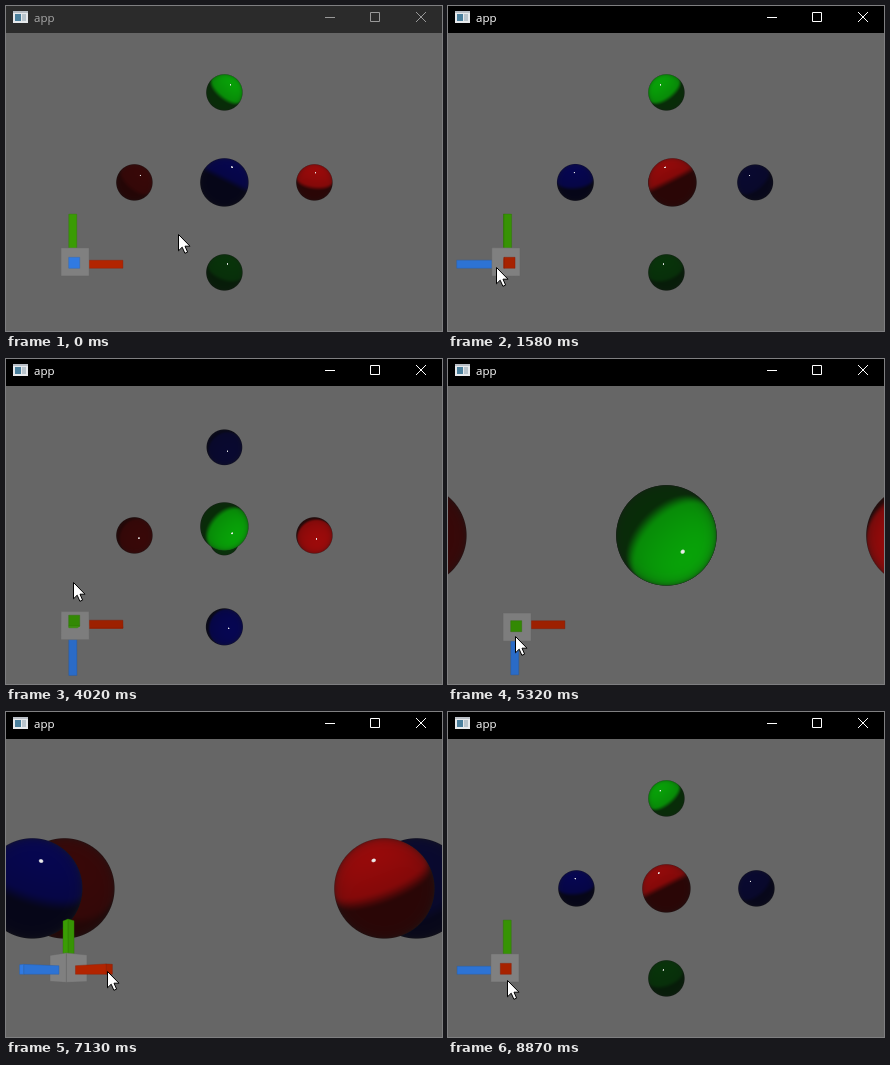
These frames come from a looping animation (436x325 px, 9.27 s). An HTML page with a canvas:

```html
<!DOCTYPE html>
<html lang="en">
<head>
<meta charset="utf-8">
<title>app</title>
<style>
  html, body { margin: 0; width: 100%; height: 100%; overflow: hidden; background: #666; }
  canvas, svg { position: absolute; left: 0; top: 0; display: block; }
  text { font: 11.5px "Open Sans", "Noto Sans", sans-serif; }
</style>
</head>
<body>
<canvas id="scene" width="436" height="325"></canvas>
<svg width="436" height="325" viewBox="0 0 436 325">
  <rect id="bar" width="436" height="27"/>
  <g id="icon">
    <rect x="7" y="5" width="15" height="12" fill="#e6e9ec"/>
    <rect x="7" y="5" width="15" height="2" fill="#b9bfc6"/>
    <rect x="9" y="8" width="6" height="7" fill="#4a7f9c"/>
    <rect x="16" y="8" width="4" height="7" fill="#b8c4cc"/>
  </g>
  <text id="label" x="28" y="16">app</text>
  <path id="buttons" fill="none" d="M319 11.5h10M364.5 6.5h9v9h-9zM410 6l10 10M420 6l-10 10"/>
  <path id="cursor" d="M.5 .5V16.8L4.2 13.2 6.9 19.3 9.6 18.1 7 12.2H12z" fill="#fff" stroke="#000" stroke-width="1"/>
</svg>
<script>
const LOOP = 9270, RATE = 0.006;
const $ = id => document.getElementById(id);
const ctx = $('scene').getContext('2d');
const buffer = document.createElement('canvas');
const bctx = buffer.getContext('2d');

const dot = (a, b) => a[0] * b[0] + a[1] * b[1] + a[2] * b[2];
const add = (a, b, k = 1) => a.map((v, i) => v + b[i] * k);
const unit = a => { const n = Math.hypot(...a); return a.map(v => v / n); };
const cross = (a, b) => [0, 1, 2].map(i => {
  const j = (i + 1) % 3, k = (i + 2) % 3;
  return a[j] * b[k] - a[k] * b[j];
});
const clamp = v => Math.min(1, Math.max(0, v));
const smooth = (a, b, v) => { v = clamp((v - a) / (b - a)); return v * v * (3 - 2 * v); };

const LIGHT = [1, 2, 1];
const SPHERES = [
  { at: [1, 0, 0], dark: [42, 6, 6], lit: [156, 10, 10] },
  { at: [-1, 0, 0], dark: [36, 6, 6], lit: [56, 8, 8] },
  { at: [0, 1, 0], dark: [8, 44, 8], lit: [8, 164, 8] },
  { at: [0, -1, 0], dark: [7, 28, 9], lit: [8, 52, 10] },
  { at: [0, 0, 1], dark: [6, 6, 24], lit: [6, 6, 82] },
  { at: [0, 0, -1], dark: [7, 7, 26], lit: [9, 9, 48] }
];

// Each turn eases exponentially towards a view: [start, yaw, pitch] in degrees.
const TURNS = [[1008, 90, 0], [2353, 0, 0], [3513, 0, 90], [5843, 0, 0], [6995, 90, 0]];
const ORTHO_ON = 4900, ORTHO_OFF = 8850, FOCUS_AT = 950;

// Pointer stops: [time, x, y]
const PATH = [
  [0, 172, 228], [410, 103, 261], [560, 103, 261], [760, 99, 260], [980, 99, 260],
  [1500, 48, 261], [1860, 48, 261], [2140, 24, 258], [2380, 24, 258], [2690, 46, 248],
  [3120, 57, 238], [3400, 67, 223], [4240, 67, 223], [4800, 67, 276], [5270, 67, 276],
  [5720, 67, 303], [6230, 67, 303], [6850, 101, 259], [7400, 101, 259],
  [8180, 62, 263], [8700, 59, 268], [LOOP, 59, 268]
];

function pointer(t) {
  const i = PATH.findIndex(p => p[0] > t);
  const [a, b] = [PATH[i - 1], PATH[i]];
  const k = smooth(a[0], b[0], t);
  return [a[1] + (b[1] - a[1]) * k, a[2] + (b[2] - a[2]) * k];
}

function camera(t) {
  let yaw = 0, pitch = 0, from = [0, 0];
  for (const [start, y, p] of TURNS) {
    if (t < start) break;
    const left = Math.exp(-RATE * (t - start));
    const rest = left < 0.004 ? 0 : left;
    yaw = y + (from[0] - y) * rest;
    pitch = p + (from[1] - p) * rest;
    from = [y, p];
  }
  yaw *= Math.PI / 180;
  pitch *= Math.PI / 180;
  const sy = Math.sin(yaw), cy = Math.cos(yaw), sp = Math.sin(pitch), cp = Math.cos(pitch);
  return {
    right: [cy, 0, -sy],
    up: [-sy * sp, cp, -cy * sp],
    back: [sy * cp, sp, cy * cp],
    ortho: t >= ORTHO_ON && t < ORTHO_OFF
  };
}

function drawSphere(s, cam) {
  const depth = dot(s.at, cam.back);
  const scale = cam.ortho ? 250 : 360 / (4 - depth);
  const x = 218.4 + dot(s.at, cam.right) * scale;
  const y = 176.4 - dot(s.at, cam.up) * scale;
  const r = 0.2 * scale + 0.2;

  // Local frame facing the eye, with light and half vectors expressed in it.
  const view = cam.ortho ? cam.back : unit(add(cam.back.map(v => v * 4), s.at, -1));
  const right = unit(cross(cam.up, view));
  const up = cross(view, right);
  const toLight = unit(add(LIGHT, s.at, -1));
  const light = [right, up, view].map(axis => dot(toLight, axis));
  const half = unit(add(light, [0, 0, 1]));

  const x0 = Math.floor(x - r) - 1, y0 = Math.floor(y - r) - 1;
  const size = Math.ceil(2 * r) + 4;
  const image = bctx.createImageData(size, size);
  for (let j = 0; j < size; j++) for (let i = 0; i < size; i++) {
    const px = x0 + i + 0.5 - x, py = y - y0 - j - 0.5;
    const d = Math.hypot(px, py);
    if (d > r + 0.5) continue;
    const q = Math.max(d, r);
    const n = [px / q, py / q, Math.sqrt(Math.max(0, 1 - (d / q) ** 2))];
    const ndl = dot(n, light);
    const lit = 0.72 * smooth(-0.04, 0.3, ndl) + 0.28 * Math.max(0, ndl);
    const rim = 0.7 * (1 - n[2]) ** 3;
    const shine = smooth(0.9983, 0.9998, dot(n, half));
    const o = (j * size + i) * 4;
    for (let c = 0; c < 3; c++) {
      let v = s.dark[c] + (s.lit[c] - s.dark[c]) * lit;
      v += (26 - v) * rim;
      image.data[o + c] = v + (235 - v) * shine;
    }
    image.data[o + 3] = 255 * clamp(r - d + 0.5);
  }
  buffer.width = buffer.height = size;
  bctx.putImageData(image, 0, 0);
  ctx.drawImage(buffer, x0, y0);
}

const EYE = 167, CUBE = [-7.1, 17.9], BEAM = [-0.2, 7.4], TIP = 51.5;
const BEAM_COLORS = [[178, 36, 0], [58, 156, 4], [48, 122, 226]];
const FACE_SHADE = [0.94, 0.88, 1];
const rgb = (c, k) => `rgb(${c.map(v => Math.round(v * k))})`;

function drawBox(ranges, color, shades, cam) {
  const eye = cam.back.map(v => v * EYE);
  for (let axis = 0; axis < 3; axis++) for (let side = 0; side < 2; side++) {
    const level = ranges[axis][side];
    if (side ? eye[axis] <= level : eye[axis] >= level) continue;
    const u = (axis + 1) % 3, v = (axis + 2) % 3;
    ctx.beginPath();
    for (const [a, b] of [[0, 0], [1, 0], [1, 1], [0, 1]]) {
      const p = [0, 0, 0];
      p[axis] = level;
      p[u] = ranges[u][a];
      p[v] = ranges[v][b];
      const k = EYE / (EYE - dot(p, cam.back));
      ctx.lineTo(63 + dot(p, cam.right) * k, 262 - dot(p, cam.up) * k);
    }
    ctx.closePath();
    ctx.fillStyle = rgb(color, shades[axis]);
    ctx.fill();
    ctx.strokeStyle = rgb(color, shades[axis] * 0.8);
    ctx.lineWidth = 0.4;
    ctx.stroke();
  }
}

function drawGizmo(cam) {
  const beams = [0, 1, 2].sort((a, b) => cam.back[a] - cam.back[b]);
  const inFront = i => cam.back[i] * EYE > CUBE[1];
  const beam = i => drawBox([0, 1, 2].map(a => a === i ? [CUBE[1], TIP] : BEAM),
    BEAM_COLORS[i], FACE_SHADE, cam);
  beams.filter(i => !inFront(i)).forEach(beam);
  drawBox([CUBE, CUBE, CUBE], [128, 128, 128], [1, 0.98, 1], cam);
  beams.filter(inFront).forEach(beam);
}

function drawChrome(t) {
  const active = t >= FOCUS_AT;
  $('bar').setAttribute('fill', active ? '#000' : '#2b2b2b');
  $('label').setAttribute('fill', active ? '#fff' : '#aaa');
  $('buttons').setAttribute('stroke', active ? '#fff' : '#999');
  $('cursor').setAttribute('transform', `translate(${pointer(t).map(Math.round)})`);
}

function render(t) {
  const cam = camera(t);
  ctx.fillStyle = '#666';
  ctx.fillRect(0, 0, 436, 325);
  [...SPHERES].sort((a, b) => dot(a.at, cam.back) - dot(b.at, cam.back))
    .forEach(s => drawSphere(s, cam));
  drawGizmo(cam);
  drawChrome(t);
}

const began = performance.now();
function tick() {
  render((performance.now() - began) % LOOP);
  requestAnimationFrame(tick);
}
tick();
</script>
</body>
</html>
```
